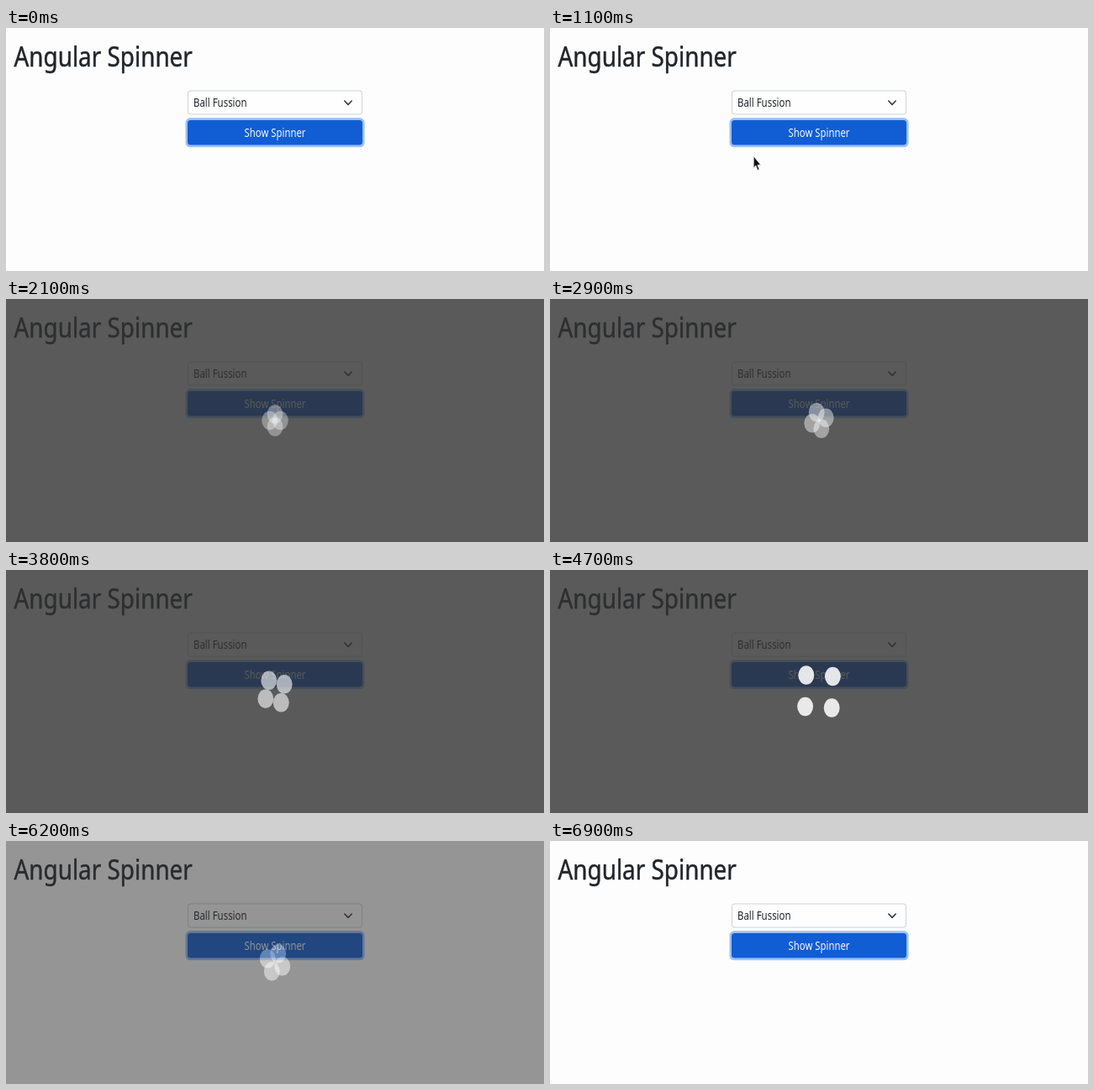
Recreate the animation shown at these times as an HTML page with a canvas. Size 640 by 290 pixels, loop 7 s.

```html
<!DOCTYPE html>
<html lang="en">
<head>
<meta charset="utf-8">
<title>Angular Spinner</title>
<style>
  html, body { margin: 0; width: 100%; height: 100%; overflow: hidden; background: #fdfdfd; }
  canvas { display: block; width: 640px; height: 290px; }
</style>
</head>
<body>
<canvas id="stage" width="640" height="290"></canvas>
<script>
const W = 640, H = 290, LOOP = 7000, STEP = 100;
const SQUEEZE = 0.84;              // the whole page is narrower than natural
const FONT = '"Noto Sans", "Open Sans", sans-serif';
const ctx = document.getElementById('stage').getContext('2d');
const layer = document.createElement('canvas');
layer.width = W;
layer.height = H;
const lctx = layer.getContext('2d');

const SPIN = { x: 320, y: 145, unit: 15, period: 1000, delay: 122 };
const REST = [[0, -0.5], [0.5, 0], [0, 0.5], [-0.5, 0]];
const PEAK = [[1.5, -1.5], [1.5, 1.5], [-1.5, 1.5], [-1.5, -1.5]];
const FADE = 300, SHOW = 1110, HIDE = 6090;

// time, x, y of the pointer tip
const POINTER = [[400, 88, 284], [900, 262, 124], [1050, 262, 124], [1300, 163, 270], [1400, 136, 300]];
const ARROW = [[0, 0], [0, 14], [3.2, 11], [5.6, 16.5], [8, 15.5], [5.6, 10.3], [9.8, 10.3]];

const clamp = v => Math.min(1, Math.max(0, v));
const mix = (a, b, k) => a + (b - a) * k;

// cubic-bezier(.25, .1, .25, 1)
function ease(x) {
  const curve = (a, b, s) => 3 * a * s * (1 - s) ** 2 + 3 * b * s * s * (1 - s) + s ** 3;
  let lo = 0, hi = 1;
  for (let i = 0; i < 24; i++) {
    const mid = (lo + hi) / 2;
    if (curve(0.25, 0.25, mid) < x) lo = mid; else hi = mid;
  }
  return curve(0.1, 1, lo);
}

function box(x, y, w, h, r, fill) {
  ctx.beginPath();
  ctx.roundRect(x, y, w, h, r);
  ctx.fillStyle = fill;
  ctx.fill();
}

function label(str, x, y, size, color, align, bold) {
  ctx.save();
  ctx.translate(x, y);
  ctx.scale(SQUEEZE, 1);
  ctx.font = `400 ${size}px ${FONT}`;
  ctx.textAlign = align;
  ctx.fillStyle = ctx.strokeStyle = color;
  ctx.fillText(str, 0, 0);
  if (bold) {
    ctx.lineWidth = bold;
    ctx.lineJoin = 'round';
    ctx.strokeText(str, 0, 0);
  }
  ctx.restore();
}

function drawPage() {
  ctx.fillStyle = '#fdfdfd';
  ctx.fillRect(0, 0, W, H);
  label('Angular Spinner', 9.5, 46, 33.2, '#212529', 'left', 0.5);

  box(216, 74.5, 208, 29, 4, '#ced4da');
  box(217, 75.5, 206, 27, 3, '#fefefe');
  label('Ball Fussion', 223, 94, 13.6, '#212529', 'left');
  ctx.beginPath();
  ctx.moveTo(402.8, 87);
  ctx.lineTo(407, 91.4);
  ctx.lineTo(411.2, 87);
  ctx.strokeStyle = '#343a40';
  ctx.lineWidth = 1.6;
  ctx.lineCap = ctx.lineJoin = 'round';
  ctx.stroke();

  box(213.5, 107.3, 213, 35, 5.5, '#98c1fb');
  box(216, 110, 208, 29.5, 3.5, '#115dd3');
  label('Show Spinner', 320, 130, 13.5, '#f7f9fd', 'center');
}

function drawBall(i, phase) {
  const rising = phase < 0.5;
  const k = ease(rising ? phase * 2 : phase * 2 - 1);
  const from = rising ? REST[i] : PEAK[i];
  const to = rising ? PEAK[i] : REST[(i + 1) % 4];
  const u = SPIN.unit;
  lctx.globalAlpha = rising ? mix(0.35, 1, k) : mix(1, 0.35, k);
  lctx.beginPath();
  lctx.ellipse(SPIN.x + mix(from[0], to[0], k) * u * SQUEEZE,
               SPIN.y + mix(from[1], to[1], k) * u,
               0.75 * u * SQUEEZE, 0.75 * u, 0, 0, Math.PI * 2);
  lctx.fill();
}

function drawSpinner(t) {
  const shown = Math.min(clamp((t - SHOW) / FADE), 1 - clamp((t - HIDE) / FADE));
  if (shown <= 0) return;
  lctx.globalAlpha = 1;
  lctx.clearRect(0, 0, W, H);
  lctx.fillStyle = 'rgba(49, 49, 49, 0.8)';
  lctx.fillRect(0, 0, W, H);
  lctx.fillStyle = '#fff';
  const phase = ((t - SPIN.delay) / SPIN.period) % 1;
  for (const i of [0, 2, 1, 3]) drawBall(i, phase);
  ctx.globalAlpha = shown;
  ctx.drawImage(layer, 0, 0);
  ctx.globalAlpha = 1;
}

function drawPointer(t) {
  const n = POINTER.findIndex(p => p[0] > t);
  if (n < 1) return;
  const a = POINTER[n - 1], b = POINTER[n];
  const k = (t - a[0]) / (b[0] - a[0]);
  ctx.save();
  ctx.translate(mix(a[1], b[1], k), mix(a[2], b[2], k));
  ctx.scale(SQUEEZE, 1);
  ctx.beginPath();
  for (const [x, y] of ARROW) ctx.lineTo(x, y);
  ctx.closePath();
  ctx.fillStyle = '#111';
  ctx.strokeStyle = '#ddd';
  ctx.lineWidth = 1;
  ctx.fill();
  ctx.stroke();
  ctx.restore();
}

const start = performance.now();
function frame() {
  const t = Math.floor(((performance.now() - start) % LOOP) / STEP) * STEP;
  drawPage();
  drawSpinner(t);
  drawPointer(t);
  requestAnimationFrame(frame);
}
frame();
</script>
</body>
</html>
```
